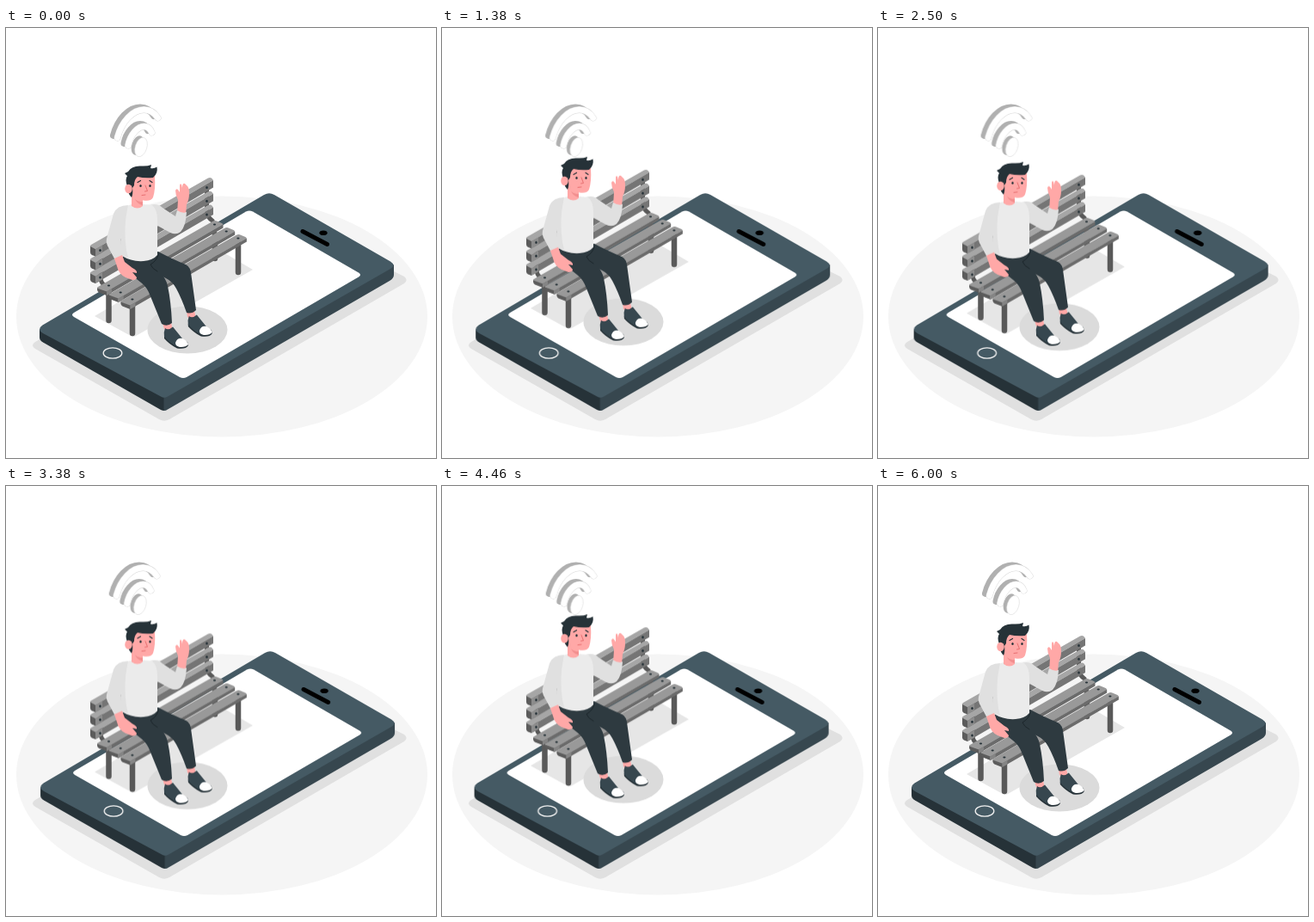
An HTML page without scripts that plays this animation: 500x500 px, repeating every 6040 ms.

```html
<!DOCTYPE html>
<html lang="en">
<head>
<meta charset="utf-8">
<title>Bench on a phone</title>
<style>
html, body { margin: 0; width: 100%; height: 100%; overflow: hidden; background: #fff; }
svg { display: block; width: 100%; height: 100%; }
.phone, .wifi, .bench { animation: 6.04s linear infinite; }
.phone { animation-name: shake; }
.wifi { animation-name: quick; }
.bench { animation-name: float; }

/* 6 s of motion, then a 40 ms rest */
@keyframes shake {
  0%, 99.338%, 100% { transform: translateX(0); }
  9.934%, 89.404% { transform: translateX(-1px); }
  19.868%, 79.47% { transform: translateX(2px); }
  29.801%, 49.669%, 69.536% { transform: translateX(-4px); }
  39.735%, 59.603% { transform: translateX(4px); }
}
/* the same shake, four times in 6 s */
@keyframes quick {
  0%, 24.834%, 49.669%, 74.503%, 99.338%, 100% { transform: translateX(0); }
  2.483%, 22.351%, 27.318%, 47.185%, 52.152%, 72.02%, 76.987%, 96.854% { transform: translateX(-1px); }
  4.967%, 19.868%, 29.801%, 44.702%, 54.636%, 69.536%, 79.47%, 94.371% { transform: translateX(2px); }
  7.45%, 12.417%, 17.384%, 32.285%, 37.252%, 42.219%, 57.119%, 62.086%, 67.053%, 81.954%, 86.921%, 91.887% { transform: translateX(-4px); }
  9.934%, 14.901%, 34.768%, 39.735%, 59.603%, 64.57%, 84.437%, 89.404% { transform: translateX(4px); }
}
@keyframes float {
  0%, 49.669%, 99.338%, 100% { transform: translateY(0); }
  24.834%, 74.503% { transform: translateY(-10px); }
}

.line { fill: none; stroke-linecap: round; stroke-linejoin: round; }
.shade { fill: #e0e0e0; }
.skin { fill: #ffa8a7; }
.dark { fill: #263238; }
.pants { fill: #2e3a40; }
</style>
</head>
<body>
<svg viewBox="0 0 500 500">
  <defs>
    <g id="back">
      <path fill="#a6a6a6" d="M98 255Q97 253 99 252L235 174.500Q237 173.500 239 174.500L241 177L104 257Z"/>
      <path fill="#757575" d="M104 257L241 177V185.500L104 265.500Z"/>
      <path fill="#5c5c5c" d="M98 254L104 257V265.500L100 264Q98 263 98 261Z"/>
      <path fill="#8c8c8c" d="M104 257L112 252.500V261L104 265.500Z"/>
      <ellipse class="dark" cx="109.500" cy="258.500" rx="1.300" ry="1.500"/>
      <ellipse class="dark" cx="233.500" cy="185.500" rx="1.300" ry="1.500"/>
    </g>
    <g id="seat">
      <path fill="#999" d="M107 303.500Q105 302 107 301L240 225Q243 223.500 245 224.500L251 227Q253 228 252 229L117 307Z"/>
      <path fill="#6b6b6b" d="M117 306.500L252.500 228.500V232.500L117 311Z"/>
      <path fill="#5c5c5c" d="M106 302.500L117 306.500V311L108 307.500Q106 306 106 304Z"/>
      <path fill="#858585" d="M117 306.500L123 303V307.500L117 311Z"/>
      <ellipse class="dark" cx="119.500" cy="299.500" rx="1.600" ry="1"/>
      <ellipse class="dark" cx="242.500" cy="228.500" rx="1.600" ry="1"/>
    </g>
    <path id="big" d="M125 125C130 106 143 92.500 156 92.500Q166 92.500 172 102"/>
    <path id="small" d="M137.500 134C140 121 149 112 156 112Q162 112 165 119"/>
    <ellipse id="dot" rx="6.800" ry="11.500" transform="rotate(18)"/>
    <g id="shoe">
      <path class="dark" d="M184 361Q190 368 199 372.500Q209 374 212 369L211 365L184 358Z"/>
      <path fill="#37474f" d="M185 349Q183 354 184 359Q191 367 199 370.500L205 361L194 347.500Q189 352 185 349Z"/>
      <path fill="#fff" d="M197 366Q199 360 205 361Q211 364 212 368Q209 371.500 202 371Q197 370 197 366Z"/>
    </g>
  </defs>

  <ellipse cx="251" cy="335.500" rx="239" ry="140" fill="#f5f5f5"/>
  <path class="shade" d="M34 365L300 213Q306 210 312 213L463 289Q468 293 463 297L190 455Q184 458.500 178 455L34 373Q28 369 34 365Z"/>

  <g class="phone">
    <path class="dark" d="M39 350V360Q39 363 43 365.500L180 444Q182 445 184 445V428Z"/>
    <path fill="#37474f" d="M183.500 428V445Q186 445 188 443.500L446 294Q451 291 451 287V275Z"/>
    <path fill="#455a64" d="M42.500 345.500L300 194Q306 190.500 312 194L447 271.500Q454 276 447 280L188 428.500Q184 431 180 428.500L43 355Q35.500 350.500 42.500 345.500Z"/>
    <path fill="#fff" d="M79 331L279 213.500Q283 211.500 287 213.500L410 284.500Q414 287 410 289.500L210 406Q206 408 202 406L79 336Q75 333.500 79 331Z"/>
    <ellipse cx="124" cy="378" rx="10.800" ry="6.200" fill="none" stroke="#f0f0f0" stroke-width="1.300"/>
    <path class="line" stroke="#000" stroke-width="5" d="M345 236.500L373.500 251.500"/>
    <ellipse cx="369" cy="238.300" rx="4.600" ry="2.800"/>
  </g>

  <g class="wifi">
    <g class="line" stroke="#b0b0b0" stroke-width="8">
      <use href="#big"/>
      <use href="#small"/>
    </g>
    <use href="#dot" transform="translate(153 136.500)" fill="#b0b0b0"/>
    <g transform="translate(4.500 2.500)">
      <g class="line" stroke="#d6d6d6" stroke-width="7.800">
        <use href="#big"/>
        <use href="#small"/>
      </g>
      <g class="line" stroke="#fff" stroke-width="7">
        <use href="#big"/>
        <use href="#small"/>
      </g>
      <use href="#dot" transform="translate(152.500 136)" fill="#fff" stroke="#d6d6d6" stroke-width=".5"/>
    </g>
  </g>

  <g class="bench">
    <path fill="#e6e6e6" d="M103 335L236 257Q241 254 246 257L287 281L151 358Q148 360 145 358Z"/>
    <ellipse fill="#dbdbdb" cx="211" cy="351" rx="46.500" ry="27.500"/>

    <g class="line" stroke="#595959" stroke-width="6.500">
      <path d="M119.500 305V340M243 240V268M270 250V284M147 322V355"/>
      <path stroke-width="5" d="M110 258V290Q110 297 116 300M233.500 186V214Q234 220 240 224"/>
    </g>
    <use href="#back" y="31.500"/>
    <use href="#back" y="15.700"/>
    <use href="#back"/>
    <use href="#seat"/>
    <use href="#seat" x="13.700" y="8"/>
    <use href="#seat" x="27.400" y="16"/>

    <!-- raised arm -->
    <path class="skin" d="M199 216L200 200Q197 194 197 189Q198 186 200 188L202 191V184Q202 180 204 182L205 186Q205 180 208 181L210 183Q213 185 213 192Q213 200 210 205L209 217Z"/>
    <path fill="#e0e0e0" d="M167 206Q176 203 182 209L197 219L199 212Q205 216 210 214Q209 231 203 237Q198 241 191 238L171 227Z"/>

    <!-- legs -->
    <path class="skin" d="M210 329H219L221 337Q216 341 211 336ZM182 343H192L194 351Q188 355 184 350Z"/>
    <use href="#shoe" x="27.800" y="-14"/>
    <use href="#shoe"/>
    <path class="pants" d="M158 262L177 260Q194 269 209 275Q215 278 215.500 288L221 328Q216 333 210 331Q204 314 198 303Q194 295 186 291L168 282Z"/>
    <path class="pants" d="M136 263Q134 279 142 284L157 296Q164 301 168 312L181 344Q187 348 193 343Q192 319 188 300Q186 291 180 286L169 277L176 262Z"/>
    <path class="line" stroke="#1d272c" stroke-width="1" d="M177 264Q175 271 168 275Q170 280 176 283"/>

    <!-- torso and resting arm -->
    <path fill="#ebebeb" d="M146 205Q133 208 133 222L135 265Q146 272 160 271Q171 270 176 264V224Q176 211 170 206L159 205Z"/>
    <path fill="#e0e0e0" d="M142 206Q129 206 125 216L117 245Q116 250 119 255L127 270L137 265L133 248L138 231Q140 216 142 206Z"/>
    <path fill="#e0e0e0" d="M139 222Q137 250 142 267L134 264L133 248Z"/>
    <path class="skin" d="M126 268L135 264L138 272L147 279Q153 282 152 285L147 284L152 290Q152 293 147 293L139 290Q131 286 129 277Z"/>

    <!-- head -->
    <path class="skin" d="M146 193H159V207Q153 212 146 207Z"/>
    <path fill="#f28f8f" d="M150 199Q154 203 159 202V206Q153 205 150 199Z"/>
    <path class="skin" d="M147 172Q160 166 173 172Q174 188 171 197Q168 202 160 200.500Q149 199 147 193Z"/>
    <path class="dark" d="M141 184Q138 176 141 172L138 169L142 167Q146 160 157 160.500Q164 161 169 159L168 163Q172 164 175.500 161.500Q177 169 171 174Q161 175 153 173Q149 176 149 183L147 186Q148 193 146 197Q142 193 142 188Z"/>
    <ellipse class="skin" cx="142.500" cy="187" rx="4.300" ry="5.200"/>
    <g class="dark">
      <ellipse cx="156.500" cy="183.500" rx="1.200" ry="1.500"/>
      <ellipse cx="167.500" cy="183.500" rx="1.200" ry="1.500"/>
    </g>
    <path class="line" stroke="#263238" stroke-width="1.200" d="M153 179.500L156.500 177.500M167 177.500L170 179.500"/>
    <path class="line" stroke="#e86f70" stroke-width="1" d="M162 183L164.500 189.500L161.500 190M158 194.500L162 194"/>
  </g>
</svg>
</body>
</html>
```
